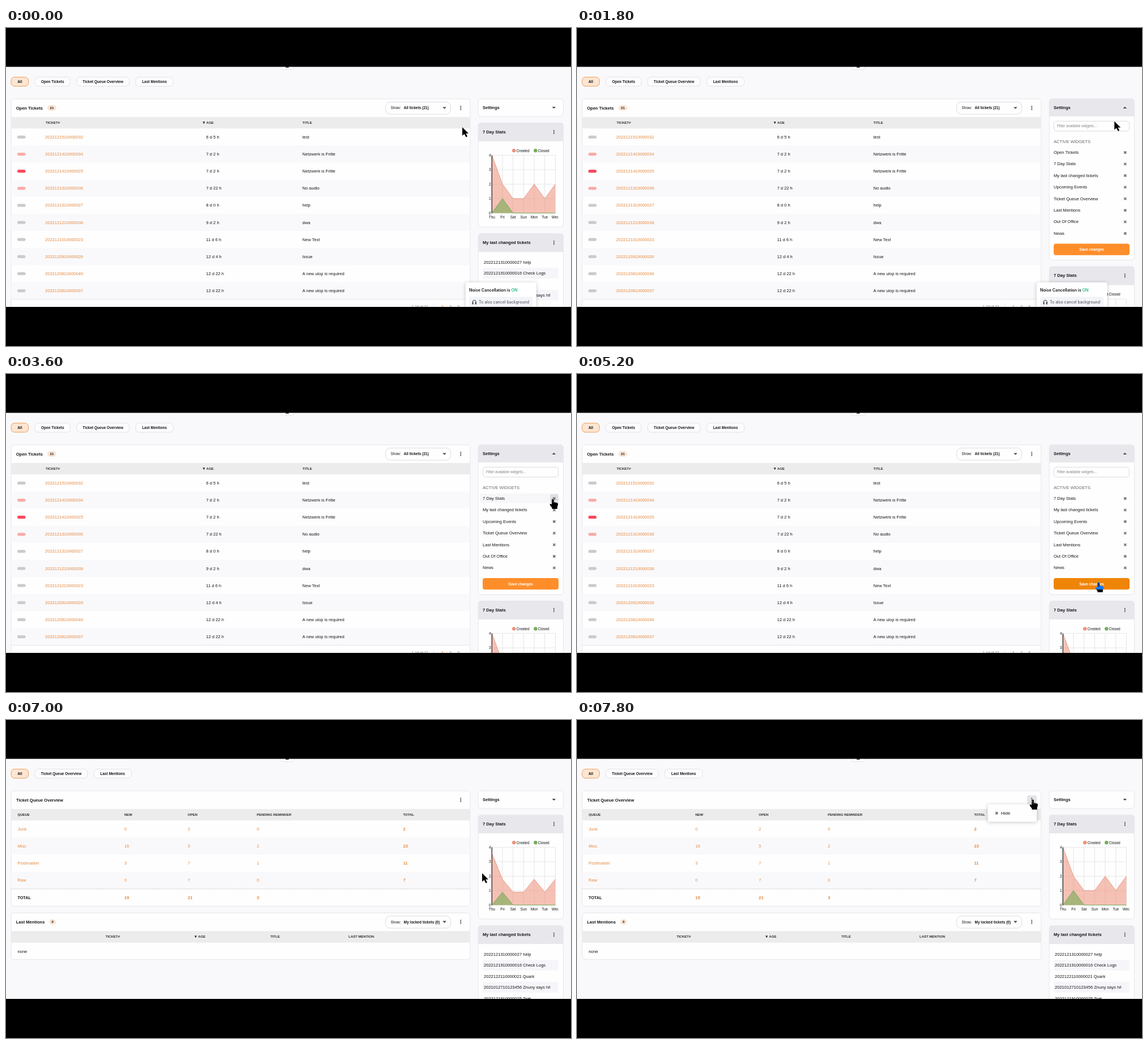
Write an HTML page that moves like this. It is 998 px wide and 561 px high and loops after 8000 ms.

```html
<!DOCTYPE html>
<html lang="en">
<head>
<meta charset="utf-8">
<title>Ticket dashboard</title>
<style>
html, body { margin: 0; width: 100%; height: 100%; overflow: hidden; background: #000; }
svg { display: block; }
#stage { width: 100vw; height: 100vh; font-family: "Liberation Sans", Arial, sans-serif; isolation: isolate; }
.pop { filter: drop-shadow(0 1px 3px rgba(0, 0, 0, .22)); }
.cursor { mix-blend-mode: difference; fill: #fff; }
</style>
</head>
<body>
<svg id="stage" viewBox="0 0 998 561"></svg>
<script>
const LOOP = 8000, STEP = 200;
const INK = '#161618', ORANGE = '#e6883c', LINE = '#e6e6ea', PAGE = '#f9f9fc', GREY = '#e8e8ec', BAR = '#ececed';
const ROW = 30.13, ITEM = 20.4;
const stage = document.getElementById('stage');

const tickets = [
  ['2022121510000032', '6 d 5 h', 'test', 0],
  ['2022121410000034', '7 d 2 h', 'Netzwerk is Fritte', 1],
  ['2022121410000025', '7 d 2 h', 'Netzwerk is Fritte', 2],
  ['2022121310000036', '7 d 22 h', 'No audio', 1],
  ['2022121310000027', '8 d 0 h', 'help', 0],
  ['2022121210000038', '9 d 2 h', 'dwa', 0],
  ['2022121010000023', '11 d 6 h', 'New Text', 0],
  ['2022120910000026', '12 d 4 h', 'Issue', 0],
  ['2022120810000046', '12 d 22 h', 'A new ulop is required', 0],
  ['2022120810000037', '12 d 22 h', 'A new ulop is required', 0]
];
const queues = [['Junk', 0, 2, 0, 2], ['Misc', 16, 5, 2, 23], ['Postmaster', 3, 7, 1, 11], ['Raw', 0, 7, 0, 7]];
const queueCols = [20.5, 209, 321, 443, 701.5];
const widgets = ['Open Tickets', '7 Day Stats', 'My last changed tickets', 'Upcoming Events',
  'Ticket Queue Overview', 'Last Mentions', 'Out Of Office', 'News'];
const changed = ['2022121310000027 help', '2022121910000016 Check Logs', '2022122110000021 Quark',
  '2021012710123456 Znuny says hi!', '2022121910000025 Tset'];

// Pointer tip: time, x, y
const path = [[0, 806, 175], [200, 811, 173], [1000, 936, 149], [1200, 942, 146], [1400, 943, 147],
  [1600, 945, 151], [2600, 966, 219], [2800, 966, 220], [3600, 966, 220], [4400, 921, 367],
  [6600, 921, 367], [7200, 801, 222], [7400, 793, 184], [7600, 805, 140], [8000, 805, 140]];

function tipAt(t) {
  const i = path.findIndex((k, n) => n && t <= k[0]);
  const [a, x, y] = path[i - 1], [b, u, v] = path[i];
  const p = (t - a) / (b - a);
  return [x + (u - x) * p, y + (v - y) * p];
}

// y is the middle of the capital letters
function text(x, y, s, { size = 7.55, bold, fill = INK, anchor = 'start', font } = {}) {
  return `<text x="${x}" y="${y + size * .36}" font-size="${size}" fill="${fill}" text-anchor="${anchor}"` +
    `${bold ? ` font-weight="${bold === true ? 700 : bold}"` : ''}${font ? ` font-family="${font}"` : ''}>${s}</text>`;
}
const rect = (x, y, w, h, fill, r = 0, stroke = 'none') =>
  `<rect x="${x}" y="${y}" width="${w}" height="${h}" rx="${r}" fill="${fill}" stroke="${stroke}"/>`;
const line = (x1, y1, x2, y2, stroke, more = '') =>
  `<path d="M${x1} ${y1}L${x2} ${y2}" stroke="${stroke}" fill="none" ${more}/>`;
const move = (x, y, s) => `<g transform="translate(${x} ${y})">${s}</g>`;
const crop = (x, y, w, h, s) =>
  `<svg x="${x}" y="${y}" width="${w}" height="${h}" viewBox="${x} ${y} ${w} ${h}">${s}</svg>`;
const caret = (x, y, up) => `<path d="M${x - 3.2} ${y + (up ? 1.6 : -1.6)}h6.4l-3.2 ${up ? -3.4 : 3.4}z" fill="#444"/>`;
const dots = (x, y) => [-2.7, 0, 2.7].map(d => `<circle cx="${x}" cy="${y + d}" r=".95" fill="#333"/>`).join('');
const cross = (x, y) => `<path d="M${x - 2} ${y - 2}l4 4m0-4l-4 4" stroke="#666" stroke-width="1.5"/>`;
const label = (x, y, s) => text(x, y, s, { size: 6, bold: true, fill: '#2c2c30' });
const sorted = (x, y, s) => `<path d="M${x} ${y - 1.8}h4l-2 4z" fill="#222"/>` + label(x + 6.3, y, s);

function card(y, h, title, grey) {
  return rect(834.2, y, 150.2, h, '#fefefe', 5, LINE) +
    (grey ? `<path d="M834 ${y + grey}V${y + 5}q0-5 5-5h140.500q5 0 5 5V${y + grey}z" fill="${GREY}"/>` : '') +
    text(842, y + 15.6, title, { bold: true });
}
function tab(x, w, s, on) {
  return rect(x, 86.7, w, 16, on ? '#fde6d2' : '#fcfcfe', 6, on ? '#ee9d58' : '#e2e2e6') +
    text(x + w / 2, 95, s, { size: 6.5, bold: true, anchor: 'middle' });
}
function picker(x, y, s) {
  return rect(x, y - 10.4, 115, 21.4, '#fefefe', 8, '#dcdce0') + text(x + 9, y, 'Show:', { size: 6.5 }) +
    text(x + 32, y, s, { size: 6.5, bold: true }) + caret(x + 104, y);
}
const badge = (x, y, w, s) => rect(x - w / 2, y - 5, w, 10, '#fce6d5', 5) +
  text(x, y, s, { size: 6.2, bold: true, anchor: 'middle' });

function ticketPage() {
  const rows = tickets.map(([id, age, title, level], i) => {
    const y = 192.2 + i * ROW;
    return (i % 2 ? rect(9.5, y - 15, 810, ROW, PAGE) : '') +
      rect(20, y - 2.4, 14.5, 5.2, ['#cbcbcf', '#f9aba6', '#f8485e'][level], 2.6) +
      text(69, y, id, { fill: ORANGE }) + text(353.5, y, age) + text(523.5, y, title);
  }).join('');
  const foot = { size: 7, fill: '#777' };
  return tab(9, 30.6, 'All', true) + tab(51, 62.5, 'Open Tickets') +
    tab(124.8, 93, 'Ticket Queue Overview') + tab(229, 66.5, 'Last Mentions') +
    rect(9.2, 125, 810.6, 400, '#fefefe', 5, LINE) + text(17.7, 141, 'Open Tickets', { bold: true }) +
    badge(81, 141, 16, '21') + picker(670.5, 141, 'All tickets (21)') + dots(803.3, 141) +
    rect(9.2, 157, 810.6, 20.2, BAR) + label(70, 167, 'TICKET#') + sorted(347.5, 167, 'AGE') + label(523.8, 167, 'TITLE') +
    rows + line(9, 478.6, 820, 478.6, LINE) + text(716.5, 491.5, '1-10 of 21', { ...foot, size: 6.5 }) +
    line(755.5, 486, 755.5, 500, LINE) + text(769, 491.5, '1', { ...foot, fill: ORANGE, bold: true }) +
    text(783, 491.5, '2', foot) + text(797, 491.5, '3', foot);
}

function queuePage(t) {
  const loading = t < 6800;
  const hot = t === 7200 || t === 7400 ? 1 : -1;
  const rows = queues.map((q, i) => {
    const y = 192.2 + i * ROW;
    return (i === hot ? rect(9.5, y - 15, 810, ROW, '#fdecdd') : i % 2 ? rect(9.5, y - 15, 810, ROW, PAGE) : '') +
      q.map((v, c) => text(queueCols[c], y, v, { fill: ORANGE, bold: c === 4 })).join('');
  }).join('');
  const sums = [19, 21, 3].map((v, c) => text(queueCols[c + 1], 313.3, v, { fill: ORANGE, bold: true })).join('');
  return tab(9, 30.6, 'All', !loading) + tab(51, 93, 'Ticket Queue Overview') + tab(155.2, 66.3, 'Last Mentions') +
    rect(9.2, 125, 810.6, 203.5, '#fefefe', 5, LINE) + text(18, 141.3, 'Ticket Queue Overview', { bold: true }) +
    dots(803.3, 141) + rect(9.2, 157, 810.6, 20.2, BAR) +
    ['QUEUE', 'NEW', 'OPEN', 'PENDING REMINDER', 'TOTAL'].map((s, c) => label(queueCols[c], 167, s)).join('') +
    rows + line(9, 298, 820, 298, '#ccc', 'stroke-dasharray="2 1"') +
    text(20.5, 313.3, 'TOTAL', { size: 7.2, bold: true }) + sums + (loading ? mentionsLoading() : mentions());
}

function mentionCols(xs, y) {
  return label(xs[0], y, 'TICKET#') + sorted(xs[1], y, 'AGE') + label(xs[2], y, 'TITLE') + label(xs[3], y, 'LAST MENTION');
}
function mentions() {
  return rect(9.2, 340.3, 810.6, 82.4, '#fefefe', 5, LINE) + text(17.7, 356.2, 'Last Mentions', { bold: true }) +
    badge(82.2, 356.2, 12, '0') + picker(670.5, 356.2, 'My locked tickets (0)') + dots(803.3, 356.2) +
    rect(9.2, 372.5, 810.6, 20.2, BAR) + mentionCols([176, 333, 467, 605], 382.3) + text(20.5, 407.8, 'none');
}
function mentionsLoading() {
  const small = { size: 6.5 };
  const menu = [[20.5, 410, 'My|locked|tickets|(0)'], [58, 410, 'Tickets|in My|Queues|(0)'],
    [96, 410, 'Tickets|in My|Services|(1)'], [133.5, 413.5, 'All|tickets|(1)']]
    .map(([x, y, s], c) => s.split('|').map((w, i) => text(x, y + i * 7.7, w, { ...small, bold: !c })).join('')).join('');
  return rect(9.2, 340.3, 810.6, 118, '#fefefe', 5, LINE) + text(17.7, 356.2, 'Last Mentions', { bold: true }) +
    dots(803.3, 356.2) + rect(9.2, 372.5, 810.6, 21, BAR) + picker(20.5, 389.8, 'My locked tickets (0)') +
    rect(9.2, 407.5, 810.6, 20.2, BAR) + mentionCols([202, 353, 482, 614], 417.5) +
    `<g class="pop">${rect(9, 393.5, 162.500, 57, '#fefefe', 3)}</g>` + menu;
}

// grow: 0 hides the chart, 1 shows it in full
function chart(grow) {
  if (grow < 0) return '';
  const X = i => 858.3 + i * 18.68, Y = v => 326.5 - v * 25.5;
  const days = ['Thu', 'Fri', 'Sat', 'Sun', 'Mon', 'Tue', 'Wed'];
  const trace = vals => 'M' + vals.map((v, i) => `${X(i)} ${Y(v * grow)}`).join('L');
  const area = (vals, fill, stroke) => `<path d="${trace(vals)}V${Y(0)}H${X(0)}z" fill="${fill}" fill-opacity=".55"/>` +
    `<path d="${trace(vals)}" fill="none" stroke="${stroke}"/>`;
  const key = (x, s, fill) => `<circle cx="${x}" cy="216.3" r="3.2" fill="${fill}"/>` + text(x + 4.2, 216.3, s, { size: 6.5 });
  let s = key(897.2, 'Created', '#ef917a') + key(935.3, 'Closed', '#72ad5c');
  for (let v = 0; v < 5; v++)
    s += line(X(0), Y(v), X(6), Y(v), '#e7e7e7') + text(856.5, Y(v), v, { size: 6.5, anchor: 'end' });
  days.forEach((d, i) => {
    s += line(X(i), Y(4), X(i), Y(0), i ? '#e4e4e4' : '#222') + text(X(i), 333.3, d, { size: 6.5, anchor: 'middle' });
  });
  s += area([4, 2, 1, 1, 2, 1, 2], '#ef917a', '#e89a85') + area([0, 1, 0, 0, 0, 0, 0], '#6aac4b', '#76a85c');
  return crop(842, 205, 133.6, 140, s + line(X(0), Y(4), X(0), Y(0), '#222'));
}

function settings(drop, t, [x, y]) {
  const list = t < 3200 ? widgets : widgets.slice(1);
  const open = drop > 50;
  const rows = list.map((w, i) => {
    const mid = 219.3 + i * ITEM, hot = open && x > 842 && Math.abs(y - mid) < ITEM / 2;
    return (hot ? rect(837, mid - 8.5, 139, 17, '#f7f7fa', 2) : '') +
      (hot && x > 961 ? rect(961, mid - 7.5, 15, 15.500, '#e0e0e4', 3) : '') + text(842, mid, w) + cross(968.3, mid + .3);
  }).join('');
  const top = 217.2 + list.length * ITEM;
  const save = rect(842, top, 134, 20.3, y > top && t > 3600 ? '#ef8508' : '#ff8e2a', 4) +
    text(909, top + 10.2, 'Save changes', { size: 6.5, bold: true, fill: '#fff', anchor: 'middle' });
  const body = rect(842.3, 164.3, 133.4, 17.6, '#fefefe', 5, '#dadade') +
    text(848, 173, 'Filter available widgets...', { size: 6.4, fill: '#85858a' }) +
    text(842, 200, 'ACTIVE WIDGETS', { size: 7.6, fill: '#66666c' }) + rows + save;
  return card(125, 31 + drop, 'Settings', open && 31) + caret(967.8, 140.5, open) +
    (drop ? crop(830, 156, 160, drop - 1, body) : '');
}

function side(t, tip) {
  const drop = t < 1400 || t >= 6600 ? 0 : t < 1600 ? 40.5 : t < 3200 ? 253.5 : 233.1;
  const grow = t < 6600 ? 1 : t < 6800 ? -1 : 1 - Math.max(0, (7400 - t) / 700) ** 4;
  const items = changed.map((s, i) => {
    const y = 413.3 + i * 19.4;
    return (i % 2 ? rect(842, y - 9.7, 134, 19, '#f6f6fa', 2) : '') + text(844, y, s);
  }).join('');
  return settings(drop, t, tip) + move(0, drop,
    card(167.4, 183.6, '7 Day Stats', 32.5) + dots(967.8, 183.3) + chart(grow) +
    card(362.8, 200, 'My last changed tickets', 32.5) + dots(967.8, 378.6) + items);
}

function notice() {
  const font = "Inter, 'Open Sans', sans-serif";
  return `<g class="pop">${rect(811.8, 448.8, 124.8, 60, '#fff', 3)}</g>` +
    text(818, 462, 'Noise Cancellation is <tspan fill="#2fb58f">ON</tspan>', { size: 7.2, bold: 600, font }) +
    rect(818, 474, 112, 30, '#f3f4f8', 3) +
    `<path d="M824.300 485v-2a2.900 2.900 0 0 1 5.800 0v2" fill="none" stroke="#333a4a"/>` +
    rect(823.6, 483.5, 2, 4, '#333a4a') + rect(828.8, 483.5, 2, 4, '#333a4a') +
    text(835, 483.6, 'To also cancel background', { size: 7, fill: '#444a58', font });
}

function rowMenu(t) {
  return (t >= 7600 ? rect(795, 133, 17, 16, '#e4e4e8', 3) + dots(803.3, 141) : '') +
    (t >= 7800 ? `<g class="pop">${rect(725.500, 148.800, 86.500, 30.800, '#fefefe', 3)}</g>` +
      cross(741.3, 164.4) + text(749, 164, 'Hide', { size: 8 }) : '');
}

function pointer(t, [x, y]) {
  const hand = t < 1600 ? x > 834 : t < 3800 ? x > 961 : t < 6800 ? y > 359 : t >= 7600;
  const d = hand
    ? 'M-2 1.500Q0-1 2 1.500V6l5.500 1.300q2 .6 1.500 3l-1.300 5V18H-1.500v-2L-5 11.500q-.8-2.500 1-2.500L-2 10z'
    : 'M0 0V15l3.500-3 3 5.500 2.500-1.300L6.300 11H11z';
  return `<path class="cursor" transform="translate(${x} ${y})" d="${d}"/>`;
}

function draw(t) {
  const tip = tipAt(t);
  const shift = t === 6600 ? 23.7 : 0;
  stage.innerHTML = rect(0, 0, 998, 561, PAGE) +
    (shift ? '' : rect(485.5, 55, 22.500, 18.500, '#fcfcfe', 4, LINE)) +
    move(0, shift, (t < 6600 ? ticketPage() : queuePage(t)) + side(t, tip)) +
    rowMenu(t) + (t < 2000 ? notice() : '') +
    rect(0, 0, 998, 68.5, '#000') + rect(0, 492, 998, 69, '#000') +
    rect(494, 68, 5.5, shift ? 1 : 2, '#333') + pointer(t, tip);
}

let last = -1;
function tick(now) {
  const t = Math.floor(now % LOOP / STEP) * STEP;
  if (t !== last) draw(last = t);
  requestAnimationFrame(tick);
}
draw(0);
requestAnimationFrame(tick);
</script>
</body>
</html>
```
